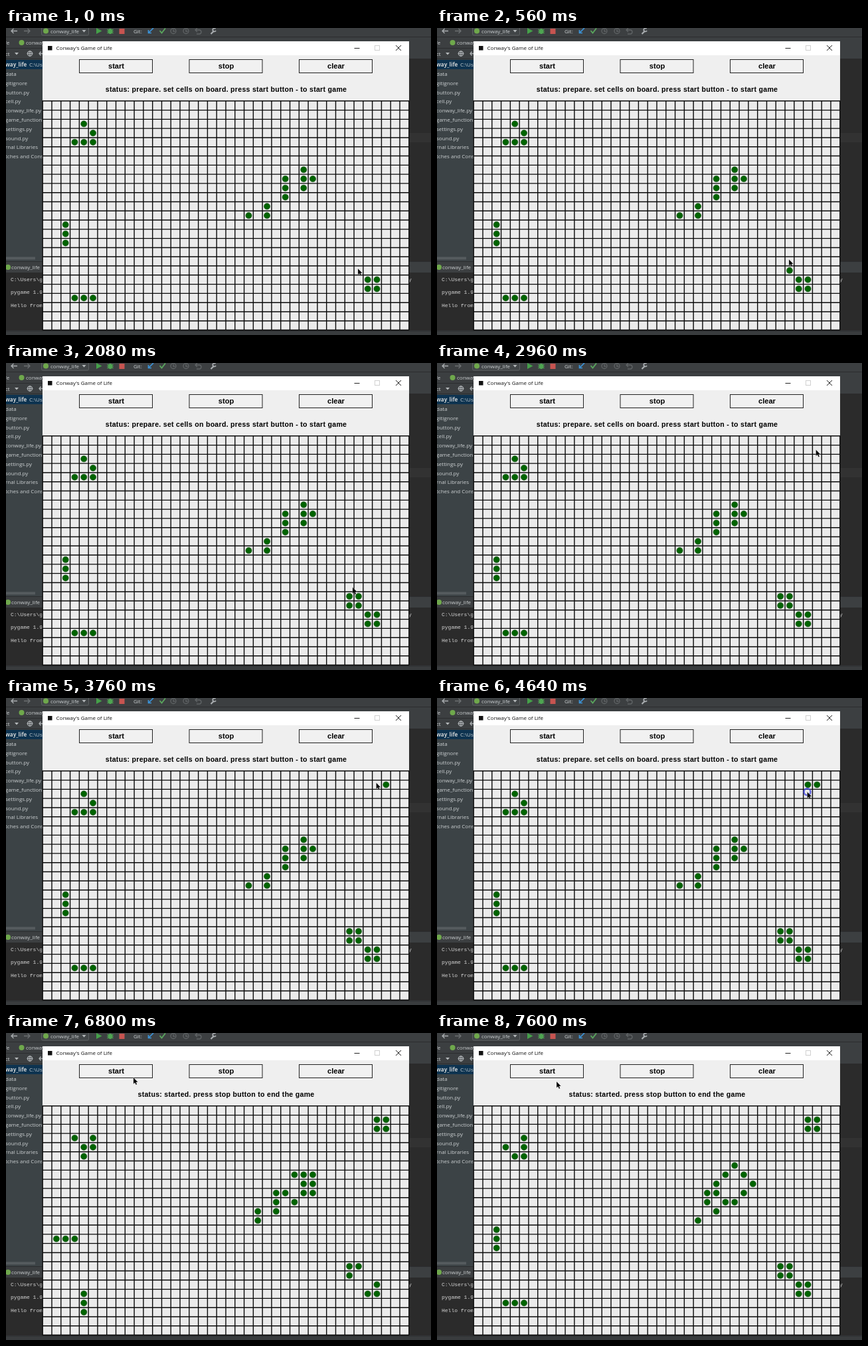
Write an HTML page that moves like this. It is 640x462 px and loops after 7680 ms.

```html
<!DOCTYPE html>
<html lang="en">
<head>
<meta charset="utf-8">
<title>Game of Life</title>
<style>
  html, body { margin: 0; width: 100%; height: 100%; overflow: hidden; background: #2b2b2b; }
  svg { display: block; width: 640px; height: 462px; }
  text { white-space: pre; }
  .ide { font: 8px "Open Sans", "Noto Sans", sans-serif; fill: #ccd0d2; }
  .bold { font-weight: bold; }
  .mono { font: 8px "Liberation Mono", "DejaVu Sans Mono", monospace; fill: #d4d4d4; }
  .caption { font: 8px "Open Sans", "Noto Sans", sans-serif; fill: #111; }
  .label { font: bold 11.1px "Liberation Sans", Arial, sans-serif; text-anchor: middle; }
  .status { font: bold 10.6px "Liberation Sans", Arial, sans-serif; letter-spacing: .27px; text-anchor: middle; }
</style>
</head>
<body>
<svg viewBox="0 0 640 462">
  <rect width="640" height="462" fill="#2b2b2b"/>
  <g id="ide">
    <rect width="640" height="46" fill="#3c3f41"/>
    <rect y="46" width="56" height="306" fill="#3c4346"/>
    <rect x="606" y="158" width="34" height="14" fill="#323232"/>
    <rect y="352" width="640" height="16" fill="#3c3f41"/>
    <rect y="455" width="640" height="7" fill="#393c3e"/>
    <path d="M0 13.5H640M0 30.5H56M0 46.5H56M0 351.5H640M0 456H640" stroke="#2b2d2f"/>
    <rect y="48" width="56" height="14" fill="#0d3350"/>
    <rect y="344.5" width="44" height="4" fill="#555b5e"/>
    <rect x="53.5" y="-3" width="71" height="14" rx="2" fill="#414547" stroke="#5c6062"/>
    <g fill="none" stroke="#a9adb0" stroke-width="1.3">
      <path d="M17 4.5H8M11.5 1L8 4.500L11.5 8"/>
      <path d="M27 4.5H36M32.5 1L36 4.500L32.5 8" stroke="#6c7072"/>
      <g stroke="#606466">
        <circle cx="252" cy="4.5" r="4"/><path d="M252 2V5H254.5"/>
        <circle cx="271" cy="4.5" r="4"/><path d="M271 2V5H273.5"/>
        <path d="M286 3H291A3 3 0 0 1 291 9H287M288 0L285 3L288 6"/>
      </g>
      <path d="M308.5 9L313 4.5" stroke-width="2.2"/>
      <path d="M315.5 1A2.5 2.5 0 1 0 316 4" stroke-width="1.8"/>
      <path d="M222 0L214.5 7.5M214.5 3V7.5H219" stroke="#3b93d8" stroke-width="1.7"/>
      <path d="M231.5 4L234.5 7.5L240 .5" stroke="#5aa75d" stroke-width="1.8"/>
      <circle cx="36" cy="38.5" r="3.5"/>
      <path d="M36 34V43M31.5 38.5H40.5M50 38.5H56M52.5 35.5L50 38.5L52.5 41.5"/>
    </g>
    <path d="M136 0L144.5 4.5L136 9Z" fill="#45a049"/>
    <g stroke="#4fa552" stroke-width="1.2">
      <ellipse cx="157" cy="5" rx="2.6" ry="3.5" fill="#4fa552"/>
      <path d="M152.5 2L161.5 8M152.5 8L161.5 2M152 5H162"/>
    </g>
    <rect x="170.5" y="1" width="8" height="8" fill="#c75450"/>
    <path d="M114.5 3H120.5L117.5 6.5ZM13 37H19L16 40.5Z" fill="#b5b9bb"/>
    <g fill="#6fa84c"><circle cx="60" cy="4.5" r="4"/><circle cx="23.5" cy="22" r="4"/><circle cx="3" cy="360" r="4"/></g>
  </g>
  <g id="window">
    <rect x="55" y="20" width="552" height="435" fill="#efefef"/>
    <rect x="55" y="20" width="552" height="21" fill="#fff"/>
    <rect x="63" y="27" width="6.5" height="6.5" fill="#111"/>
    <path d="M524.5 30.5H532.5M587 26L595 34M595 26L587 34" stroke="#222"/>
    <rect x="555.5" y="26.5" width="7" height="7" fill="none" stroke="#d0d0d0"/>
    <text class="caption" x="75.5" y="33">Conway's Game of Life</text>
    <text class="status" id="status" x="331.5" y="95.5"></text>
  </g>
  <path id="grid" fill="#ebebeb" stroke="#0a0a0a" stroke-width="1.4"/>
  <g id="cells" fill="#006400" stroke="#003f00" stroke-width=".5"></g>
  <circle id="ring" fill="none" stroke="#3e42dc" stroke-width="2.5"/>
  <path id="cursor" d="M0 0V9.6L2.2 7.6L3.8 11L5.4 10.3L3.9 7H6.8Z" stroke="#fff" stroke-opacity=".5" stroke-width=".5"/>
</svg>
<script>
const LOOP = 7680, STEP = 80;
const COLS = 40, ROWS = 25, PITCH = 13.79, LEFT = 55.2, TOP = 109.8;
const REACTION = 320, RING_LIFE = 350, REST = 160, GENERATION = 480;
const $ = id => document.getElementById(id);

function add(parent, tag, attrs, text = '') {
  const node = document.createElementNS('http://www.w3.org/2000/svg', tag);
  for (const key in attrs) node.setAttribute(key, attrs[key]);
  node.textContent = text;
  return parent.appendChild(node);
}

const center = ([col, row]) => [LEFT + (col + .5) * PITCH, TOP + (row + .5) * PITCH];

function place(col, row, pattern) {
  return pattern.split('/').flatMap((line, r) =>
    [...line].flatMap((mark, c) => mark === 'O' ? [[col + c, row + r]] : []));
}

const initial = [
  ...place(3, 2, '.O/..O/OOO'),
  ...place(22, 7, '......O/....O.OO/....O.O/....O/..O/O.O'),
  ...place(2, 13, 'O/O/O'),
  ...place(3, 21, 'OOO'),
  ...place(35, 19, 'OO/OO')
];

// Each cell click aims a little above the middle of its cell.
function cellClick(time, ...cell) {
  const [x, y] = center(cell);
  return { time, cell, x: x - 1, y: y - 3 };
}

const start = { time: 5920, x: 202, y: 62 };
const clicks = [
  cellClick(80, 34, 18), cellClick(720, 34, 17), cellClick(1040, 33, 17), cellClick(1680, 33, 18),
  cellClick(3200, 37, 1), cellClick(3840, 36, 1), cellClick(4560, 36, 2), cellClick(5120, 37, 2),
  start
];
const stops = [...clicks, { time: LOOP + STEP, x: 180, y: 73 }];
const started = start.time + REACTION;

function drawScene() {
  const ide = (x, y, text, style = 'ide') => add($('ide'), 'text', { class: style, x, y }, text);
  const tree = ['data', 'gitignore', 'button.py', 'cell.py', 'conway_life.py', 'game_functions',
    'settings.py', 'sound.py', 'rnal Libraries', 'tches and Cons'];
  tree.forEach((name, i) => ide(-1, 72 + i * 13.8, name));
  ide(-1, 58, 'way_life', 'ide bold');
  ide(35, 58, 'C:\\Users');
  ide(67, 7.5, 'conway_life');
  ide(192, 7.5, 'Git:');
  ide(-2, 25, 'fe');
  ide(30, 25, 'conway_life');
  ide(-1, 41.5, 'ct');
  ide(8, 363, 'conway_life');
  ['C:\\Users\\g', 'pygame 1.9', 'Hello from'].forEach((line, i) => ide(7, 381 + i * 19.3, line, 'mono'));
  ide(606, 381, 'y', 'mono');

  ['start', 'stop', 'clear'].forEach((name, i) => {
    const x = 110.5 + i * 165.5;
    add($('window'), 'rect', { x, y: 47.5, width: 110, height: 20, fill: '#f1f1f1', stroke: '#222' });
    add($('window'), 'text', { class: 'label', x: x + 55.5, y: 61.3 }, name);
  });

  const width = COLS * PITCH, height = ROWS * PITCH;
  let d = `M${LEFT} ${TOP}h${width}v${height}h${-width}z`;
  for (let c = 1; c < COLS; c++) d += `M${LEFT + c * PITCH} ${TOP}v${height}`;
  for (let r = 1; r < ROWS; r++) d += `M${LEFT} ${TOP + r * PITCH}h${width}`;
  $('grid').setAttribute('d', d);
}

function evolve(cells) {
  const alive = new Set(cells.map(String)), counts = {};
  for (const [c, r] of cells)
    for (let dc = -1; dc <= 1; dc++)
      for (let dr = -1; dr <= 1; dr++)
        if (dc || dr) {
          const key = `${c + dc},${r + dr}`;
          counts[key] = (counts[key] || 0) + 1;
        }
  return Object.keys(counts)
    .filter(key => counts[key] === 3 || (counts[key] === 2 && alive.has(key)))
    .map(key => key.split(',').map(Number));
}

function cellsAt(t) {
  const added = clicks.filter(({ cell, time }) => cell && t >= time + REACTION);
  let cells = [...initial, ...added.map(({ cell }) => cell)];
  for (let next = started + GENERATION; next <= t; next += GENERATION) cells = evolve(cells);
  return cells;
}

// The pointer rests around each click and eases from one stop to the next.
function pointerAt(t) {
  const i = stops.findIndex(stop => stop.time > t);
  const to = stops[i], from = stops[i - 1] || to;
  const depart = from.time + REST, arrive = to.time - REST;
  const p = arrive > depart ? Math.min(1, Math.max(0, (t - depart) / (arrive - depart))) : 1;
  const ease = p * p * (3 - 2 * p);
  return [from.x + (to.x - from.x) * ease, from.y + (to.y - from.y) * ease];
}

let shownCells = '';
function render(t) {
  const cells = cellsAt(t), key = cells.join(' ');
  if (key !== shownCells) {
    shownCells = key;
    $('cells').replaceChildren();
    for (const cell of cells) {
      const [cx, cy] = center(cell);
      add($('cells'), 'circle', { cx, cy, r: 4.6 });
    }
  }
  $('status').textContent = t < started
    ? 'status: prepare. set cells on board. press start button - to start game'
    : 'status: started. press stop button to end the game';

  const click = clicks.find(({ time }) => t >= time && t < time + RING_LIFE);
  const ring = $('ring');
  ring.setAttribute('opacity', click ? 1 - (t - click.time) / RING_LIFE : 0);
  if (click) {
    ring.setAttribute('cx', click.x);
    ring.setAttribute('cy', click.y);
    ring.setAttribute('r', 3.2 + (t - click.time) * .022);
  }
  $('cursor').setAttribute('transform', `translate(${pointerAt(t)})`);
}

drawScene();
const begin = performance.now();
function tick() {
  const t = (performance.now() - begin) % LOOP;
  render(Math.floor(t / STEP) * STEP);
  requestAnimationFrame(tick);
}
tick();
</script>
</body>
</html>
```
